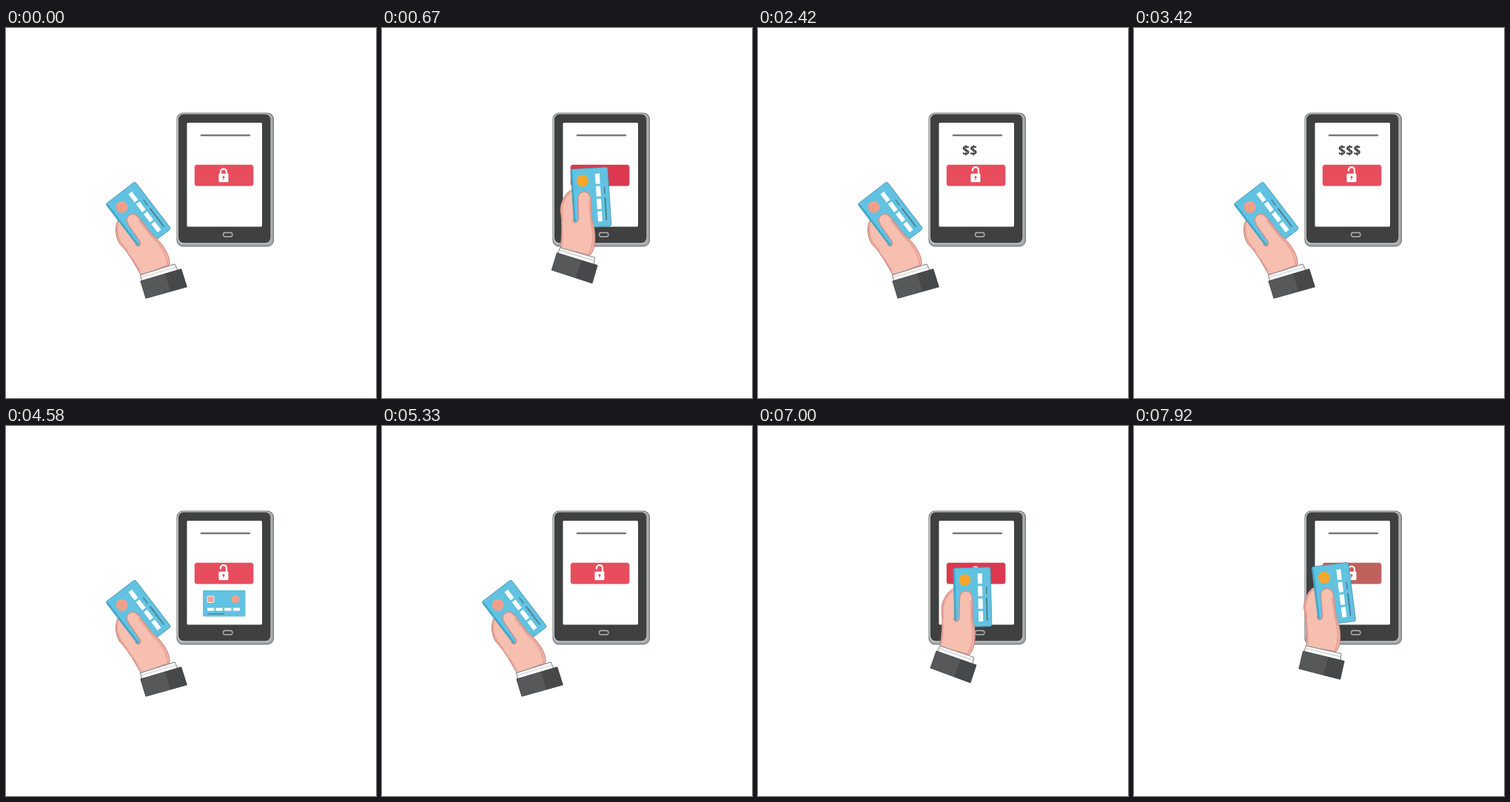
Recreate the animation shown at these times as an HTML page. Size 500 by 500 pixels, loop 8000 ms.

```html
<!DOCTYPE html>
<html lang="en">
<head>
<meta charset="utf-8">
<title>Card payment</title>
<style>
  html, body { margin: 0; width: 100%; height: 100%; overflow: hidden; background: #fff; }
  svg { display: block; width: 100%; height: 100%; }
  .dollars { font: bold 17.5px "Open Sans", "Noto Sans", sans-serif; fill: #444; }
</style>
</head>
<body>
<svg viewBox="0 0 500 500">
  <!-- tablet -->
  <rect x="231" y="115" width="130.5" height="180" rx="8" fill="#a3a7a7" stroke="#6b6d6d"/>
  <rect x="231.5" y="115.5" width="127" height="176.5" rx="8" fill="#c6caca"/>
  <rect x="233" y="116.5" width="124.5" height="174" rx="7" fill="#3f4141"/>
  <rect x="244.5" y="128" width="101.5" height="140.5" rx="1.5" fill="#fff"/>
  <rect x="293.5" y="276.5" width="12.5" height="5.5" rx="2.7" fill="none" stroke="#b4b6b6" stroke-width="1.3"/>
  <path d="M264 145H329" stroke="#777" stroke-width="2.6" stroke-linecap="round"/>

  <g class="dollars">
    <text x="276" y="171.5">$</text>
    <text x="286.3" y="171.5">$</text>
    <text x="296.6" y="171.5">$</text>
  </g>

  <rect id="button" x="254.8" y="184.8" width="79.6" height="28.6" rx="3.5"/>
  <path id="shackle" fill="none" stroke="#fff" stroke-width="2.3"/>
  <rect x="287.5" y="196.8" width="13" height="11.4" rx="1" fill="#fff"/>
  <circle cx="294" cy="201.5" r="1.5" fill="#e84d5e"/>
  <path d="M294 201.5V205" stroke="#e84d5e" stroke-width="1.1"/>

  <!-- saved card -->
  <g id="saved">
    <rect x="266" y="222" width="57.5" height="35.5" rx="1.5" fill="#62c2e1"/>
    <rect x="272" y="230" width="9" height="8.5" rx="1" fill="#f2a08c" stroke="#fff" stroke-width=".9"/>
    <circle cx="310" cy="234" r="5.5" fill="#f2a08c"/>
    <path d="M272 247.8H316" stroke="#fff" stroke-width="4" stroke-dasharray="9.2 2.4"/>
    <path d="M272 254H295" stroke="#42788c" stroke-width="1.2"/>
  </g>

  <!-- hand, drawn in its pose on the tablet -->
  <g id="hand">
    <path d="M264 220C257 223 249 234 248 246Q250 262 248 282L246 300L282 312Q294 298 292 275L275 250Z"
      fill="#f6bfb0" stroke="#b9827a"/>
    <path d="M262 223C255 228 250 238 249.5 248Q251.5 265 249 297" fill="none" stroke="#e9a296" stroke-width="2.5"/>
    <g transform="rotate(-1.4 264 192)">
      <rect x="264" y="192" width="50" height="80" rx="2.5" fill="#62c2e1" stroke="#4690a8" stroke-width=".8"/>
      <path d="M265.3 194V270" stroke="#3da8cd" stroke-width="1.8"/>
      <circle id="badge" cx="279" cy="208.5" r="8"/>
      <path d="M299.5 200V266" stroke="#fff" stroke-width="6" stroke-dasharray="14 3"/>
      <path d="M308 233V264" stroke="#48707f" stroke-width="1.5"/>
      <path d="M308 218V228" stroke="#48707f" stroke-width="1.2"/>
    </g>
    <path d="M256 258H264Q264.5 264 268 264Q272 264 272 257L272.5 233Q273 223 281 223Q289 223 289.5 234L290 262C295 278 294 298 287 307L281 312L248 300Q252 278 250 262Z" fill="#f6bfb0"/>
    <path d="M264.5 259Q264.5 264 268 264Q272 264 272 257L272.5 233Q273 223 281 223Q289 223 289.5 234L290 262C295 278 294 298 287 307L281 312"
      fill="none" stroke="#d58f85" stroke-width="1.4"/>
    <path d="M287.5 236L288.5 263C292 280 291 297 283 308L266 304" fill="none" stroke="#e9a296" stroke-width="2"/>
    <path d="M245.5 297L292 312.5L290 322L242 306Z" fill="#fafafa" stroke="#666" stroke-width=".8"/>
    <path d="M245 300.5L290 316.5" stroke="#c4c4c4"/>
    <path d="M241 304L295 323L287 347L233 327Z" fill="#575859" stroke="#3c3d3e" stroke-width=".8"/>
    <path d="M274 315.5L295 323L287 347L265 339Z" fill="#464849"/>
  </g>
</svg>
<script>
const LOOP = 8000, CYCLE = 5920;
const $ = id => document.getElementById(id);
const dollars = document.querySelectorAll(".dollars text");

const ramp = (t, a, b) => Math.min(1, Math.max(0, (t - a) / (b - a)));

// progress of the reach against ms from the rest pose
const REACH = [[0, 0], [80, .16], [170, .37], [250, .55], [340, .71], [420, .84],
               [500, .9], [600, .94], [750, .963], [1000, 1]];

function reach(ms) {
  if (ms <= 0) return 0;
  const i = REACH.findIndex(p => p[0] > ms);
  if (i < 0) return 1;
  const [a, u] = REACH[i - 1], [b, v] = REACH[i];
  return u + (v - u) * ramp(ms, a, b);
}

function draw(time) {
  const t = time % CYCLE;

  const u = t < 1250 ? reach(t - 80) : reach(2420 - t);
  const dx = -68 * u * (1 - u) ** 2, dy = -24 * u * (1 - u);
  $("hand").setAttribute("transform", `translate(${dx} ${dy}) rotate(${-36 * (1 - u)} 270 414)`);
  $("badge").setAttribute("fill", u > .75 ? "#f6a82c" : "#f2a08c");

  const flash = t > 1960 && t < 2120;
  $("button").setAttribute("fill", flash ? "#c0605c" : u > .75 ? "#dc3850" : "#e84d5e");

  const open = ramp(t, 1920, 2160) * (1 - ramp(t, 5330, 5580));
  const top = 194.5 - 2.5 * open, left = 197.5 - 4 * open;
  $("shackle").setAttribute("d", `M290 ${left}V${top}A4 4 0 0 1 298 ${top}V198`);

  dollars.forEach((d, i) => {
    const on = 2250 + i * 165, off = 3830 - i * 165;
    d.style.opacity = t >= on && t < off ? 1 : 0;
  });

  $("saved").style.opacity = ramp(t, 4120, 4450) * (1 - ramp(t, 5000, 5330));
}

function tick() {
  draw(performance.now() % LOOP);
  requestAnimationFrame(tick);
}
draw(0);
requestAnimationFrame(tick);
</script>
</body>
</html>
```
